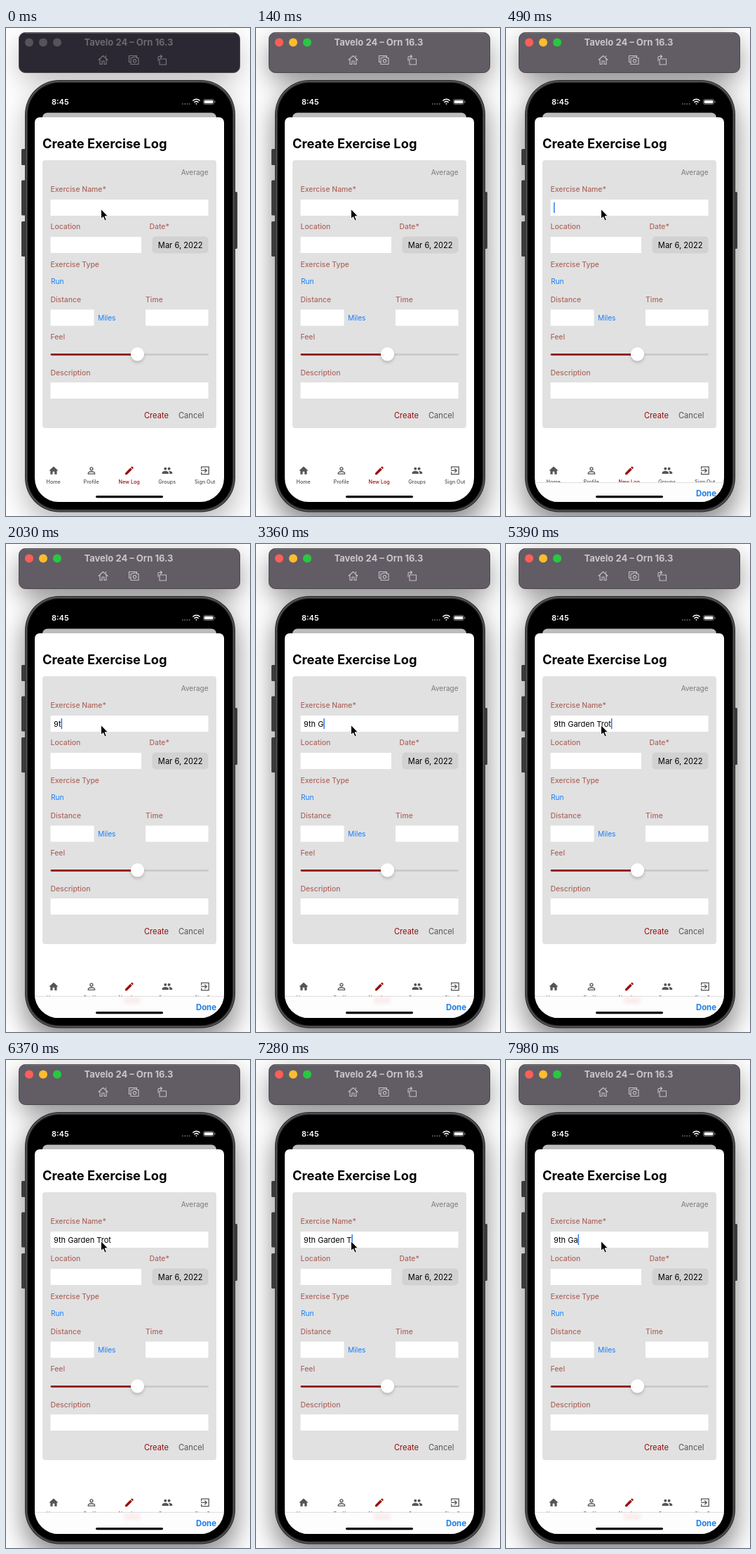
Write an HTML page that moves like this. It is 348x694 px and loops after 8000 ms.

```html
<!DOCTYPE html>
<html lang="en">
<head>
<meta charset="utf-8">
<title>Create Exercise Log</title>
<style>
  html, body { margin: 0; width: 100%; height: 100%; overflow: hidden; background: #fff; }
  svg { display: block; }
  text { font-family: Inter, Roboto, sans-serif; }
  .bar { fill: #2c2833; }
  .title { font-size: 13px; font-weight: 700; fill: #6b6870; }
  .lights circle { fill: #56535a; }
  .tools { fill: none; stroke: #7b7880; stroke-width: 1.1; stroke-linejoin: round; stroke-linecap: round; }
  .shadow { opacity: .55; }
  .active .bar { fill: #625c65; }
  .active .title { fill: #c9c6cb; }
  .active .tools { stroke: #c4c1c6; }
  .active .shadow { opacity: 1; }
  .active .lights :nth-child(1) { fill: #fe5f58; }
  .active .lights :nth-child(2) { fill: #febc2e; }
  .active .lights :nth-child(3) { fill: #28c840; }
  .label text { font-size: 10.4px; font-weight: 500; fill: #ad675f; }
  .link { font-size: 10.2px; fill: #157efb; }
  .button { font-size: 11.1px; }
  .nav { fill: #555; }
  .nav text { font-size: 7.2px; font-weight: 500; text-anchor: middle; }
  .nav .line { fill: none; stroke: #555; stroke-width: 2; }
  .nav .current { fill: #990f0f; }
  #typed { font-size: 11px; white-space: pre; }
</style>
</head>
<body>
<svg id="stage" width="348" height="694" viewBox="0 0 348 694">
  <defs>
    <filter id="wide" x="-40%" y="-60%" width="180%" height="260%"><feGaussianBlur stdDeviation="18"/></filter>
    <filter id="soft" x="-50%" y="-50%" width="200%" height="200%"><feGaussianBlur stdDeviation="2"/></filter>
    <clipPath id="screen"><path d="M41 88H311V640a34 34 0 0 1-34 34H75a34 34 0 0 1-34-34Z"/></clipPath>
  </defs>

  <rect width="348" height="694" fill="#fefefe"/>
  <g class="shadow" filter="url(#wide)" fill-opacity=".45">
    <rect x="20" y="20" width="312" height="54" rx="10"/>
    <rect x="25" y="88" width="304" height="620" rx="52"/>
  </g>

  <!-- window title bar -->
  <rect class="bar" x="18.5" y="6.5" width="315" height="57" rx="9" stroke="#4a464d"/>
  <path d="M27 7.2H325" stroke="#8b878d" stroke-width=".7"/>
  <g class="lights">
    <circle cx="33" cy="20.5" r="6"/><circle cx="53" cy="20.5" r="6"/><circle cx="73" cy="20.5" r="6"/>
  </g>
  <text class="title" x="175" y="25" text-anchor="middle">Tavelo 24 – Orn 16.3</text>
  <g class="tools">
    <path d="M132 45.5 138.5 39.5 145 45.5M134 44.5V51.5H137V47H140V51.5H143V44.5M142.5 41V39.5"/>
    <path d="M177.5 48.5H175.5V39.5H186.5V41.5M178 42.5H180.5L181.5 41.3H185.5L186.5 42.5H189V51.5H178Z"/>
    <circle cx="183.5" cy="46.8" r="2.2"/>
    <path d="M219 44H228.5V52H219ZM217 46.5V41.5Q217 40.5 218 40.5H222M220.5 38.5 222.5 40.5 220.5 42.5"/>
  </g>

  <!-- phone body -->
  <g fill="#3b3b3d">
    <rect x="22" y="172" width="7" height="23" rx="1.5"/>
    <rect x="22" y="216.5" width="7" height="50" rx="1.5"/>
    <rect x="22" y="275" width="7" height="50" rx="1.5"/>
    <rect x="324" y="233" width="6" height="81" rx="1.5"/>
  </g>
  <rect x="27" y="74" width="300" height="614.5" rx="49" fill="#2c2c2e"/>
  <rect x="29" y="76" width="296" height="610.5" rx="47" fill="none" stroke="#59595b" stroke-width="1.4"/>
  <rect x="31" y="78" width="292" height="606.5" rx="45"/>

  <!-- status bar -->
  <text x="65" y="109" font-size="11" font-weight="600" fill="#fff">8:45</text>
  <path d="M251 108H263" stroke="#777" stroke-width="1.6" stroke-dasharray="1.6 1.7"/>
  <g fill="none" stroke="#fff" stroke-width="1.5">
    <path d="M266.3 103.5Q271.5 99 276.7 103.5M268.3 105.7Q271.5 103 274.7 105.7"/>
    <path d="M270 107.3H273L271.5 109Z" fill="#fff" stroke="none"/>
    <rect x="281.5" y="101.5" width="15" height="7" rx="2" stroke="#888" stroke-width=".8"/>
    <rect x="282.7" y="102.7" width="12.6" height="4.6" rx="1" fill="#fff" stroke="none"/>
    <path d="M298 103.7V106.3" stroke="#888" stroke-width="1"/>
  </g>

  <g clip-path="url(#screen)">
    <rect x="52" y="120.5" width="248" height="20" rx="7" fill="#bcbcbc"/>
    <rect x="41" y="127" width="270" height="570" rx="7" fill="#fff"/>
    <text x="52" y="171" font-size="18.3" font-weight="700">Create Exercise Log</text>

    <rect x="52" y="188" width="248" height="381" rx="4" fill="#e1e1e1"/>
    <text x="288.5" y="209" font-size="10" fill="#7b7b7d" text-anchor="end">Average</text>
    <g class="label">
      <text x="63.5" y="233.2">Exercise Name*</text>
      <text x="63.5" y="286.4">Location</text>
      <text x="204.5" y="286.4">Date*</text>
      <text x="63.5" y="339.6">Exercise Type</text>
      <text x="63.5" y="389.8">Distance</text>
      <text x="199" y="389.8">Time</text>
      <text x="63.5" y="442.8">Feel</text>
      <text x="63.5" y="493.6">Description</text>
    </g>
    <g fill="#fff">
      <rect x="63.5" y="244" width="225" height="23"/>
      <rect x="63.5" y="297" width="129.5" height="23"/>
      <rect x="63.5" y="400.5" width="62" height="23"/>
      <rect x="199" y="400.5" width="89.5" height="23"/>
      <rect x="63.5" y="504" width="225" height="23"/>
    </g>
    <rect x="208.5" y="296.5" width="80" height="24" rx="5" fill="#d2d2d3"/>
    <text x="248.7" y="312.7" font-size="11.1" text-anchor="middle">Mar 6, 2022</text>
    <text class="link" x="64" y="364">Run</text>
    <text class="link" x="131" y="415.6">Miles</text>

    <g stroke-width="2.8" stroke-linecap="round">
      <path d="M187 464.3H287.5" stroke="#cacaca"/>
      <path d="M65 464.3H187" stroke="#900c0c"/>
    </g>
    <circle cx="187.5" cy="466.5" r="9.5" fill-opacity=".2" filter="url(#soft)"/>
    <circle cx="187.5" cy="463.8" r="9.7" fill="#fff"/>
    <text class="button" x="197" y="555" fill="#900c0c">Create</text>
    <text class="button" x="246" y="555" fill="#555">Cancel</text>

    <!-- tab bar -->
    <g class="nav">
      <g transform="translate(60 621.5) scale(.66)"><path d="M10 20v-6h4v6h5v-8h3L12 3 2 12h3v8z"/></g>
      <g transform="translate(114 621.5) scale(.66)" class="line"><circle cx="12" cy="8" r="3"/><path d="M5 19V17C5 15.5 9 14 12 14S19 15.5 19 17V19Z"/></g>
      <g transform="translate(168 621.5) scale(.66)" class="current"><path d="M3 17.25V21h3.75L17.8 9.95l-3.75-3.75zM20.7 7a1 1 0 0 0 0-1.4l-2.3-2.3a1 1 0 0 0-1.4 0l-1.85 1.85 3.75 3.75z"/></g>
      <g transform="translate(222 621.5) scale(.66)"><circle cx="8" cy="8" r="3"/><circle cx="16" cy="8" r="3"/><path d="M8 13c-2.3 0-7 1.2-7 3.5V19h14v-2.5C15 14.2 10.3 13 8 13zm8 0-1 .05c1.2.85 2 2 2 3.45V19h6v-2.5c0-2.3-4.7-3.5-7-3.5z"/></g>
      <g transform="translate(276 621.5) scale(.66)" class="line"><path d="M4 9V4H20V20H4V15M3 12H15M11 7.5 15.5 12 11 16.5"/></g>
      <text x="67.7" y="648">Home</text>
      <text x="121.7" y="648">Profile</text>
      <text x="175.7" y="648" class="current">New Log</text>
      <text x="229.7" y="648">Groups</text>
      <text x="283.7" y="648">Sign Out</text>
    </g>

    <!-- keyboard accessory -->
    <g id="accessory">
      <rect x="41" y="643" width="270" height="60" fill="#fdfdfd"/>
      <rect id="tint" x="168" y="645" width="24" height="9" fill="#fbeded" filter="url(#soft)"/>
      <path d="M41 643.3H311" stroke="#cfcfcf" stroke-width=".7"/>
      <text x="300" y="662.7" font-size="11.4" font-weight="700" fill="#1b7fec" text-anchor="end">Done</text>
    </g>
    <rect x="128" y="664.9" width="96" height="3.4" rx="1.7"/>
  </g>

  <text id="typed" x="68" y="259.8"></text>
  <rect id="caret" y="248" width="1.5" height="15" fill="#3478e5"/>
  <path d="M135.5 257.5V271.5L138.6 268.6 141 274 143.3 273 141 267.8H145.4Z" stroke="#fff" stroke-width=".9" stroke-linejoin="round"/>
</svg>

<script>
  const LOOP = 8000;
  const ENTRY = "9th Garden Trot";
  // When each character is added, then when each is removed.
  const added = [1540, 2030, 2170, 2450, 2800, 3430, 3640, 3850, 4060, 4200, 4340, 4690, 4970, 5250, 5390];
  const removed = [6650, 6860, 7280, 7350, 7490, 7560, 7700, 7840, 7980];
  // Caret fades: [fade-out start, fade-in start]
  const blinks = [[770, 1260], [5810, 6370]];
  const FADE = 210;

  const byId = id => document.getElementById(id);
  const stage = byId("stage"), typed = byId("typed"), caret = byId("caret");
  const accessory = byId("accessory"), tint = byId("tint");
  const ramp = (t, start, length) => Math.min(1, Math.max(0, (t - start) / length));
  const passed = (times, t) => times.filter(time => time <= t).length;

  function caretOpacity(t) {
    if (t < 210) return 0;
    return blinks.reduce((opacity, [out, back]) =>
      opacity - ramp(t, out, FADE) + ramp(t, back, FADE), 1);
  }

  function draw(t) {
    stage.classList.toggle("active", t >= 70);
    const rise = 1 - (1 - ramp(t, 210, 520)) ** 3;
    accessory.setAttribute("transform", `translate(0 ${32 * (1 - rise)})`);
    tint.setAttribute("opacity", ramp(t, 490, 240));

    const text = ENTRY.slice(0, passed(added, t) - passed(removed, t));
    if (typed.textContent !== text) typed.textContent = text;
    caret.setAttribute("x", 68 + (text ? typed.getComputedTextLength() : 0));
    caret.setAttribute("opacity", caretOpacity(t));
  }

  const start = performance.now();
  function tick() {
    draw((performance.now() - start) % LOOP);
    requestAnimationFrame(tick);
  }
  tick();
</script>
</body>
</html>
```
